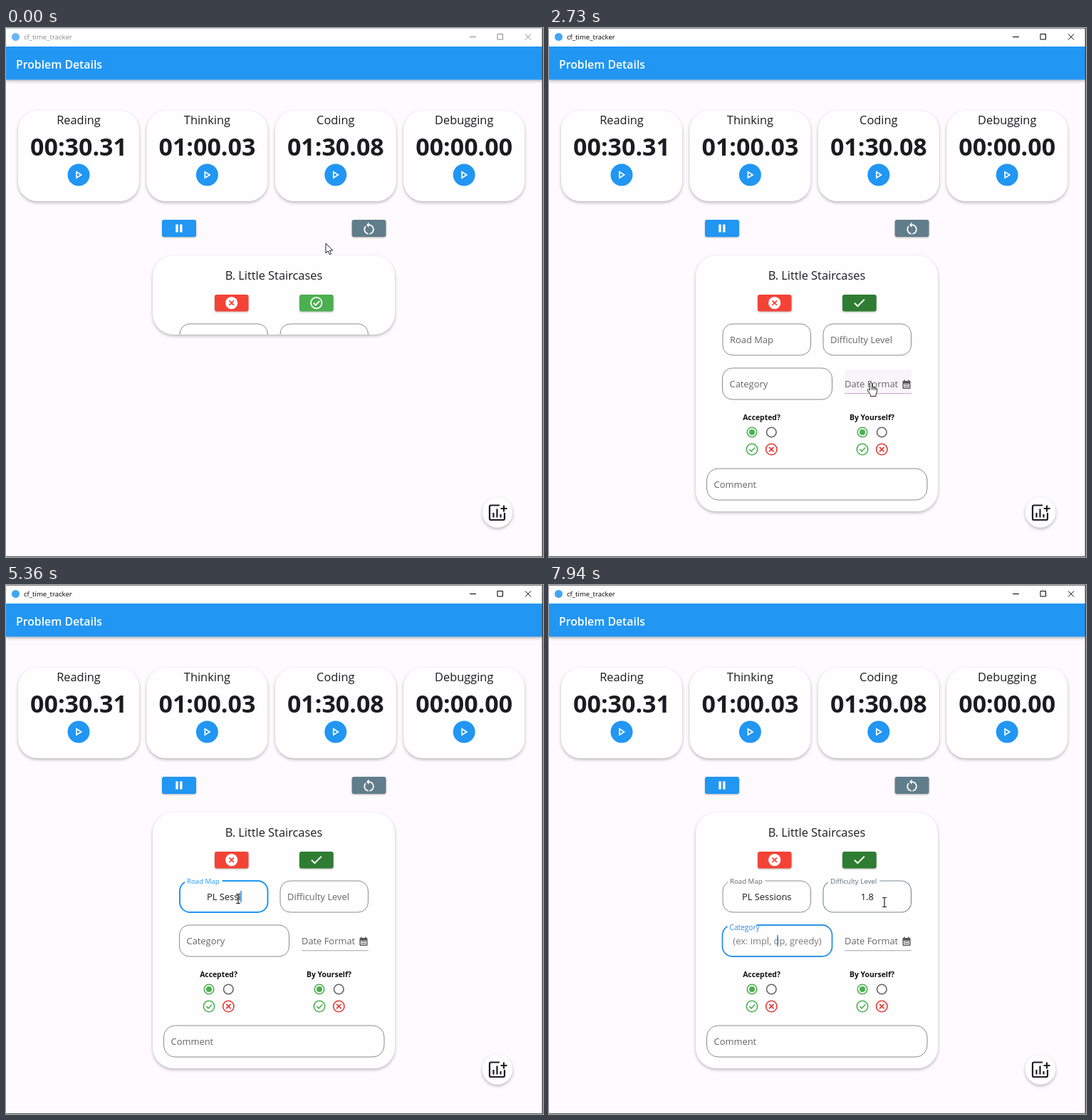
Animation of 754 by 742 pixels, one loop 8000 ms. Source, as an HTML page:

```html
<!DOCTYPE html>
<html lang="en">
<head>
<meta charset="utf-8">
<title>Time tracker</title>
<style>
  html, body { margin: 0; width: 100%; height: 100%; overflow: hidden; background: #fefafd; }
  svg { display: block; width: 754px; height: 742px; font-family: "Open Sans", "Noto Sans", sans-serif; }
  text { white-space: pre; }
  .mid { text-anchor: middle; }
  .heading { font-size: 16.4px; fill: #1c1b1f; }
  .timer { font-size: 34px; font-weight: 700; fill: #1c1b1f; }
  .label { font-size: 12.9px; fill: #666; }
  .value { font-size: 12.9px; fill: #1c1b1f; }
  .question { font-size: 10.4px; font-weight: 700; fill: #111; }
  .card { fill: #fefefe; filter: drop-shadow(0 2.5px 2px rgba(0,0,0,.27)); }
  .button { filter: drop-shadow(0 1.5px 1px rgba(0,0,0,.28)); }
  .line { fill: none; stroke-linejoin: miter; }
  .outline { fill: none; stroke: #8c8a8e; }
</style>
</head>
<body>
<svg id="stage" viewBox="0 0 754 742"></svg>
<script>
const LOOP = 8000;
const BLUE = '#2196f3', GREEN = '#4caf50', RED = '#f44336';
const stage = document.getElementById('stage');

// Static markup helpers
const rect = (x, y, w, h, r, attrs) =>
  `<rect x="${x}" y="${y}" width="${w}" height="${h}" rx="${r}" ${attrs}/>`;
const circle = (x, y, r, attrs) => `<circle cx="${x}" cy="${y}" r="${r}" ${attrs}/>`;
const text = (x, y, cls, content, attrs = '') =>
  `<text x="${x}" y="${y}" class="${cls}" ${attrs}>${content}</text>`;
const line = (d, color, width, attrs = '') =>
  `<path class="line" d="${d}" stroke="${color}" stroke-width="${width}" ${attrs}/>`;
const cross = (x, y, r, color, width) =>
  line(`M${x - r} ${y - r}l${2 * r} ${2 * r}m0 ${-2 * r}l${-2 * r} ${2 * r}`, color, width);
const tick = (x, y, s, color, width) =>
  line(`M${x - 4 * s} ${y}l${3 * s} ${3 * s}l${5.4 * s} ${-5.6 * s}`, color, width);

const timerCard = (name, time, i) => {
  const x = 17 + i * 180.4, c = x + 85;
  return rect(x, 116, 170, 127, 27, 'class="card"')
    + text(c, 134.5, 'heading mid', name)
    + text(c, 178.7, 'timer mid', time)
    + circle(c, 206, 15.5, `fill="${BLUE}"`)
    + line(`M${c - 3} 201.8v8.4l6.6 -4.2z`, '#fff', 1.7);
};

const choice = (c, question) => {
  const a = c - 13.5, b = c + 13.8;
  return text(c, 550.4, 'question mid', question)
    + circle(a, 567, 6.8, `fill="none" stroke="${GREEN}" stroke-width="1.6"`)
    + circle(a, 567, 4, `fill="${GREEN}"`)
    + circle(b, 567, 6.8, 'fill="none" stroke="#666" stroke-width="1.6"')
    + circle(a, 591, 7.7, `fill="none" stroke="${GREEN}" stroke-width="1.6"`)
    + tick(a, 591, .95, GREEN, 1.6)
    + circle(b, 591, 7.7, `fill="none" stroke="#e53935" stroke-width="1.6"`)
    + cross(b, 591, 3.2, '#e53935', 1.7);
};

const fields = [
  { id: 'road', label: 'Road Map', hint: 'PL Sessions', x: 244, y: 415, w: 123.5,
    focus: 3520, blur: 6380, typed: 'PL Sessions',
    keys: [4100, 4630, 4730, 4890, 4990, 5110, 5200, 5310, 5420, 5520, 5620] },
  { id: 'level', label: 'Difficulty Level', hint: '(ex: 1.5)', x: 385, y: 415, w: 123.5,
    focus: 6380, blur: 7830, typed: '1.8', keys: [7130, 7420, 7560] },
  { id: 'category', label: 'Category', hint: '(ex: impl, dp, greedy)', x: 243.5, y: 477, w: 154,
    focus: 7830, blur: LOOP, typed: '', keys: [] },
];

const fieldMarkup = f => {
  const c = f.x + f.w / 2, base = f.y + 26.6;
  return `<g id="${f.id}">`
    + rect(f.x, f.y, f.w, 44, 14, 'class="outline"')
    + rect(f.x + 7, f.y - 3, 0, 6, 0, 'class="gap" fill="#fefefe"')
    + text(c, base, 'label mid hint', f.hint)
    + text(c, base, 'value mid typed', '')
    + rect(c, f.y + 14, 1.6, 16, 0, `class="caret" fill="${BLUE}"`)
    + text(0, 0, 'label name', f.label) + '</g>';
};

const calendar = rect(496.5, 495, 11, 11, 1, 'fill="#555"')
  + rect(498, 498.8, 8, 5.8, 0, 'fill="#fefefe"')
  + line('M499 500.3h6M499 502.8h6', '#555', 1.4, 'stroke-dasharray="1.6 .6"')
  + line('M499 493.5v2.5M505 493.5v2.5', '#555', 1.5);

const restart = 'M12 5V2L8 6l4 4V7c3.31 0 6 2.69 6 6 0 2.97-2.17 5.43-5 5.91v2.02c3.95-.49 7-3.85 7-7.93'
  + ' 0-4.42-3.58-8-8-8zm-6 8c0-1.65.67-3.15 1.76-4.24L6.34 7.34C4.9 8.79 4 10.79 4 13'
  + 'c0 4.08 3.05 7.44 7 7.93v-2.02c-2.83-.48-5-2.94-5-5.91z';

const pointers = `
  <path id="arrow" d="M0 0v13.8l3.2-3 2.2 5 2.2-1-2.2-4.8h4.4z" fill="#fff" stroke="#222"/>
  <path id="hand" d="M-1.5 1q1.5-2 3 0v6q1.3-1 2.3.4 1.4-1 2.4.5 2-.6 2.3 1.2v4.5l-1.5 3.4v2.5h-7.5v-2l-3.8-5.5
    q-1-2.4.8-2.7l2 1.8z M1.5 7v3.5M3.9 7.5v3.2M6.2 8.2v2.8" fill="#fff" stroke="#222"/>
  <path id="beam" d="M-3 -6.5h2q1 0 1 1q0-1 1-1h2M0 -6v12M-3 6.5h2q1 0 1-1q0 1 1 1h2"
    fill="none" stroke="#222" stroke-width="1.2"/>`;

stage.innerHTML = `
  <defs><clipPath id="reveal"><rect id="revealBox" x="206" y="319" width="340" height="111"/></clipPath></defs>
  ${rect(0, 0, 754, 742, 0, 'fill="#fefafd"')}
  ${rect(0, 26, 753, 46.5, 0, `fill="${BLUE}" style="filter:drop-shadow(0 2px 2px rgba(0,0,0,.28))"`)}
  ${rect(0, 0, 754, 26, 0, 'fill="#fefefe"')}
  <g id="chrome">
    ${circle(13.5, 12.5, 5.5, 'fill="#42a5f5"')}
    ${text(25, 16.3, '', 'cf_time_tracker', 'font-size="9.6" fill="currentColor"')}
    ${line('M651 12.5h9M690 8.5h7.5v7.5h-7.5zM729 8.5l8 8m0-8l-8 8', 'currentColor', 1)}
    ${rect(0, 0, 754, .8, 0, 'fill="currentColor" opacity=".6"')}
  </g>
  ${text(14, 56.7, '', 'Problem Details', 'font-size="15.8" font-weight="600" fill="#fff"')}
  ${['Reading 00:30.31', 'Thinking 01:00.03', 'Coding 01:30.08', 'Debugging 00:00.00']
    .map((s, i) => timerCard(...s.split(' '), i)).join('')}
  ${rect(219, 269, 48, 24, 3, `class="button" fill="${BLUE}"`)}
  ${line('M240 275.5v11M245.8 275.5v11', '#fff', 3.4)}
  ${rect(485.7, 269, 47.8, 24, 3, 'class="button" fill="#607d8b"')}
  <path d="${restart}" fill="#fff" transform="translate(498.8 270.8) scale(.9)"/>
  ${rect(206, 319, 340, 111, 29, 'class="card" id="panel"')}
  ${text(376, 352.5, 'heading mid', 'B. Little Staircases')}
  ${rect(293, 374, 47.5, 23.5, 3, `class="button" fill="${RED}"`)}
  ${circle(316.7, 385.6, 8.6, 'fill="#fff"')}${cross(316.7, 385.6, 3.3, RED, 1.7)}
  ${rect(412, 374, 47.7, 23.5, 3, 'class="button" id="done"')}
  ${rect(412, 374, 47.7, 23.5, 3, 'id="doneGlow" fill="#fff"')}
  <g id="iconBefore">${circle(435.8, 385.6, 7.7, 'fill="none" stroke="#fff" stroke-width="1.8"')}
    ${tick(435.8, 385.6, 1, '#fff', 1.9)}</g>
  <g id="iconAfter">${line('M429 385.8l4.4 4.4l9.4 -9.4', '#fff', 2)}</g>
  <g clip-path="url(#reveal)">
    ${fields.map(fieldMarkup).join('')}
    <path id="dateHover" d="M415 513v-31q0-3 3-3h88q3 0 3 3v31z" fill="#f9f4fb"/>
    ${line('M415 512.8h94', '#a5a3a7', 1, 'id="dateLine"')}
    ${text(415, 504.4, 'label', 'Date Format')}${calendar}
    ${choice(298.5, 'Accepted?')}${choice(453.5, 'By Yourself?')}
    ${rect(221.5, 618, 309.5, 44, 16, 'class="outline"')}
    ${text(231.5, 644.8, 'label', 'Comment')}
  </g>
  ${circle(690, 679.5, 21.3, 'class="card"')}
  ${line('M693 669.5h-12q-2 0-2 2v16.5q0 2 2 2h17q2 0 2-2v-8', '#1c1b1f', 2.2)}
  ${line('M684.5 680v6.5M689.5 674.5v12M694.5 682v4.5', '#1c1b1f', 2.2)}
  ${line('M699 669.5v9M694.6 674h9', '#1c1b1f', 2.1)}
  ${rect(752.6, 0, 1.4, 742, 0, 'fill="#444"')}${rect(0, 741, 754, 1, 0, 'fill="#555"')}
  <g id="pointer">${pointers}</g>`;

// Timing helpers
const clamp = v => Math.min(1, Math.max(0, v));
const ramp = (t, from, to) => clamp((t - from) / (to - from));
const smooth = k => k * k * (3 - 2 * k);
const mix = (a, b, k) => `color-mix(in srgb, ${b} ${k * 100}%, ${a})`;

// Fast-out, slow-in: cubic Bézier (.4, 0, .2, 1) solved by bisection
const bezier = (a, b, u) => 3 * a * u * (1 - u) ** 2 + 3 * b * u * u * (1 - u) + u ** 3;
function fastOut(k) {
  let lo = 0, hi = 1;
  for (let i = 0; i < 16; i++) {
    const u = (lo + hi) / 2;
    if (bezier(.4, .2, u) < k) lo = u; else hi = u;
  }
  return bezier(0, 1, lo);
}
const shift = (t, start, length = 190) => fastOut(ramp(t, start, start + length));

const byId = id => document.getElementById(id);
const show = (id, on) => byId(id).setAttribute('visibility', on ? 'visible' : 'hidden');
const set = (el, attrs) => { for (const k in attrs) el.setAttribute(k, attrs[k]); };

const path = [
  [0, 449, 302], [60, 449, 302], [480, 438, 390], [1630, 438, 390], [2250, 455, 499],
  [2700, 452, 497], [2830, 452, 497], [3250, 333, 445], [3420, 326, 440],
  [5850, 326, 440], [6270, 471, 445], [LOOP, 471, 445],
];

function pointerAt(t) {
  const i = path.findIndex(p => p[0] > t);
  const [t0, x0, y0] = path[i - 1], [t1, x1, y1] = path[i];
  const k = smooth(ramp(t, t0, t1));
  return [x0 + (x1 - x0) * k, y0 + (y1 - y0) * k];
}

function drawPointer(t) {
  const [x, y] = pointerAt(t);
  const inside = (l, top, w, h) => x >= l && x <= l + w && y >= top && y <= top + h;
  const hand = inside(412, 374, 48, 24) || inside(415, 479, 94, 34);
  const beam = !hand && fields.some(f => inside(f.x, f.y, f.w, 44));
  show('hand', hand);
  show('beam', beam);
  show('arrow', !hand && !beam);
  byId('pointer').setAttribute('transform', `translate(${x} ${y})`);
}

function drawField(f, t) {
  const part = cls => byId(f.id).querySelector('.' + cls);
  const float = shift(t, f.focus);
  const active = float * (1 - shift(t, f.blur));
  const count = f.keys.filter(k => k <= t).length;
  const hintLeft = f.keys.length ? 1 - shift(t, f.keys[0]) : 1;
  const scale = 1 - .25 * float;

  const typed = part('typed');
  typed.textContent = f.typed.slice(0, count);
  part('hint').setAttribute('opacity', float * hintLeft);
  part('outline').style.cssText = `stroke:${mix('#8c8a8e', BLUE, active)};stroke-width:${1 + active}`;

  const name = part('name');
  name.style.fill = mix('#666', BLUE, active);
  name.setAttribute('transform', `translate(${f.x + 10} ${f.y + 26.6 - 23.1 * float}) scale(${scale})`);
  part('gap').setAttribute('width', (name.getComputedTextLength() * .75 + 7) * float);

  const lastKey = count ? f.keys[count - 1] : f.focus;
  const blinkOn = (t - lastKey) % 1000 < 500;
  const half = count ? typed.getComputedTextLength() / 2 : 0;
  set(part('caret'), {
    x: f.x + f.w / 2 + half - .4,
    visibility: t >= f.focus && t < f.blur && blinkOn ? 'visible' : 'hidden',
  });
}

function draw(t) {
  byId('chrome').style.color = t < 560 ? '#8a8a8a' : '#000';
  byId('chrome').firstElementChild.setAttribute('opacity', t < 560 ? .8 : 1);

  const height = 111 + 248 * shift(t, 760, 330);
  byId('panel').setAttribute('height', height);
  byId('revealBox').setAttribute('height', height);

  byId('done').style.fill = mix(GREEN, '#2e7d32', ramp(t, 760, 960));
  const glow = .08 * ramp(t, 400, 460) + .1 * (ramp(t, 560, 700) - ramp(t, 1260, 1420))
    - .08 * ramp(t, 1760, 1920);
  byId('doneGlow').setAttribute('opacity', Math.max(0, glow));
  show('iconBefore', t < 760);
  show('iconAfter', t >= 760);

  const hover = ramp(t, 2120, 2240) - ramp(t, 2930, 3050);
  byId('dateHover').setAttribute('opacity', hover);
  byId('dateLine').style.stroke = mix('#a5a3a7', '#bfa3c4', hover);

  for (const f of fields) drawField(f, t);
  drawPointer(t);
}

const start = performance.now();
function tickFrame() {
  draw((performance.now() - start) % LOOP);
  requestAnimationFrame(tickFrame);
}
tickFrame();
</script>
</body>
</html>
```
